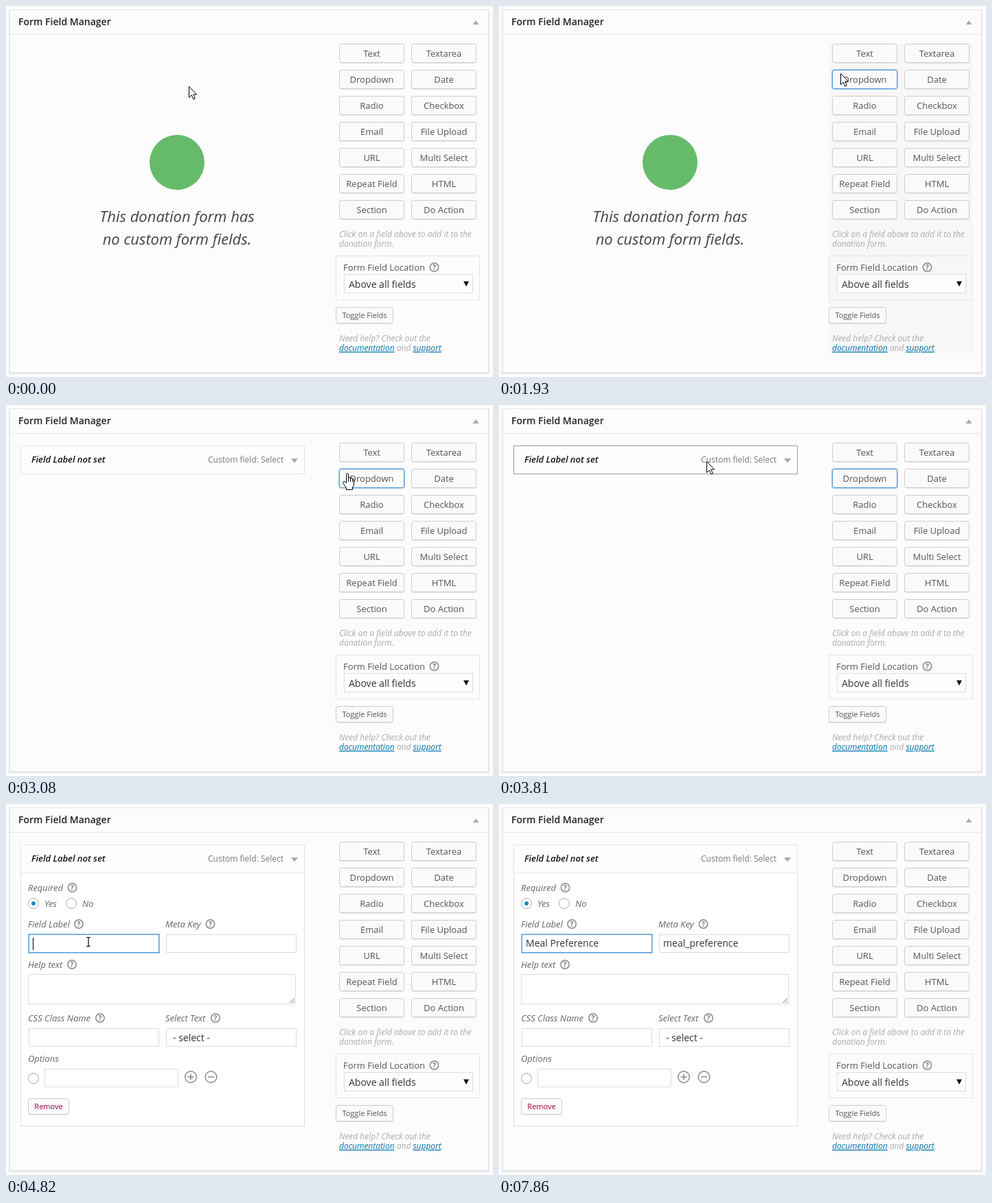
Recreate the animation shown at these times as an HTML page. Size 709x541 px, loop 8 s.

```html
<!DOCTYPE html>
<html lang="en">
<head>
<meta charset="utf-8">
<title>Form Field Manager</title>
<style>
html, body { margin: 0; width: 100%; height: 100%; overflow: hidden; background: #fcfcfc; }
svg { display: block; width: 100vw; height: 100vh; font-family: "Open Sans", sans-serif; }
text { white-space: pre; }
</style>
</head>
<body>
<svg id="stage" viewBox="0 0 709 541"></svg>
<script>
const LOOP = 8000;
const stage = document.getElementById('stage');

// Markup helpers
const text = (x, y, str, size, fill, extra = '') =>
  `<text x="${x}" y="${y}" font-size="${size}" fill="${fill}" ${extra}>${str}</text>`;
const box = (x, y, w, h, stroke, fill = '#fff', extra = '') =>
  `<rect x="${x + .5}" y="${y + .5}" width="${w - 1}" height="${h - 1}" stroke="${stroke}" fill="${fill}" ${extra}/>`;
const ring = (x, y, r, color = '#aaa', width = 1, fill = 'none') =>
  `<circle cx="${x}" cy="${y}" r="${r}" fill="${fill}" stroke="${color}" stroke-width="${width}"/>`;
const shape = (d, attrs) => `<path d="${d}" ${attrs}/>`;
const group = (id, inner, attrs = '') => `<g id="${id}" ${attrs}>${inner}</g>`;

const ITALIC = 'font-style="italic"';
const MIDDLE = 'text-anchor="middle"';

const button = (x, y, w, h, label, size, color = '#555') =>
  box(x, y + 1, w, h, '#e6e6e6', '#e6e6e6', 'rx="3"') +
  box(x, y, w, h, '#ccc', '#fafafa', 'rx="3"') +
  text(x + w / 2, y + h / 2 + size * .38, label, size, color, MIDDLE);

const help = (x, y) => ring(x, y, 6.2, '#888', 1.5) +
  text(x, y + 3.6, '?', 10, '#777', MIDDLE + ' font-weight="700"');

const label = (x, y, str, iconX) =>
  text(x, y + 5, str, 13, '#666', ITALIC) + (iconX ? help(iconX, y) : '');

const input = (x, y, w, h) => box(x, y, w, h, '#ddd');

const focus = (id, x, y, w, h, r) => group(id,
  box(x - 1, y - 1, w + 2, h + 2, '#9cc8e4', 'none', `rx="${r}"`) +
  box(x, y, w, h, '#5b9dd9', 'none', `rx="${r}"`));

const signs = (x, plus) => ring(x, 398, 8.3, '#888', 1.4) +
  shape(`M${x - 4.5} 398h9` + (plus ? `M${x} 393.5v9` : ''), 'stroke="#888" stroke-width="1.5"');

// Window frame
const frame =
  `<rect x="4" y="6" width="700" height="531" fill="#e8e8e8"/>` +
  box(5, 5, 698, 530, '#e5e5e5', '#fcfcfc') +
  shape('M5 41.5H703', 'stroke="#e5e5e5"') +
  text(18, 28, 'Form Field Manager', 14, '#222', 'font-weight="600"') +
  shape('M679.5 27L684 21L688.5 27Z', 'fill="#aaa"');

const empty = group('empty',
  '<circle cx="249" cy="228" r="40" fill="#66bb6a"/>' +
  text(249, 315, 'This donation form has', 22, '#444', ITALIC + MIDDLE) +
  text(249, 348, 'no custom form fields.', 22, '#444', ITALIC + MIDDLE));

// Sidebar
const types = ['Text', 'Textarea', 'Dropdown', 'Date', 'Radio', 'Checkbox', 'Email',
  'File Upload', 'URL', 'Multi Select', 'Repeat Field', 'HTML', 'Section', 'Do Action'];
const link = s => `<tspan fill="#0073aa" text-decoration="underline">${s}</tspan>`;

const sidebar =
  '<rect id="tint" x="480" y="55" width="210" height="451" fill="#f7f7f7"/>' +
  group('tools',
    types.map((s, i) => button(485 + i % 2 * 105, 55 + (i >> 1) * 38, 95, 28, s, 13)).join('') +
    focus('pick', 485, 93, 95, 28, 3) +
    text(485, 337, 'Click on a field above to add it to the', 12, '#aaa', ITALIC) +
    text(485, 351, 'donation form.', 12, '#aaa', ITALIC) +
    button(480, 439, 84, 24, 'Toggle Fields', 11) +
    text(485, 489, 'Need help? Check out the', 12, '#aaa', ITALIC) +
    text(485, 503, `${link('documentation')} and ${link('support')}.`, 12, '#aaa', ITALIC)) +
  group('place',
    box(480, 364, 210, 65, '#e5e5e5', 'none') +
    text(491, 386, 'Form Field Location', 13, '#555') + help(623.5, 381) +
    box(492, 391, 188, 28, '#ddd', '#fdfdfd') +
    text(499, 411, 'Above all fields', 14, '#333') +
    shape('M666 401.5H674L670 409Z', 'fill="#111"'));

// Spinner: arc segments that thicken and darken toward the head
const SEGS = 24;
const spinPoint = i => {
  const a = i / SEGS * Math.PI * 2;
  return `${(12.8 * Math.cos(a)).toFixed(2)} ${(12.8 * Math.sin(a)).toFixed(2)}`;
};
const spinner = group('spin', Array.from({ length: SEGS }, (_, i) => shape(
  `M${spinPoint(i)}A12.8 12.8 0 0 1 ${spinPoint(i + 1.1)}`,
  `fill="none" stroke="#333" stroke-opacity="${.12 + .88 * i / SEGS}" stroke-width="${1.4 + 2.2 * i / SEGS}"`)).join(''));

// Field editor
const editor = group('field',
  group('body',
    input(21, 100, 414, 370).replace('<rect', '<rect id="edge"') +
    group('form',
      label(32, 122, 'Required', 96.5) +
      ring(40, 145, 7.5, '#aaa', 1, '#fff') + '<circle cx="40" cy="145" r="3" fill="#1e8cbe"/>' +
      label(56, 145, 'Yes') + ring(95, 145, 7.5, '#aaa', 1, '#fff') + label(111, 145, 'No') +
      label(32, 175, 'Field Label', 106) + input(33, 190, 190, 27) +
      label(232, 175, 'Meta Key', 297.5) + input(233, 190, 190, 27) +
      label(32, 234, 'Help text', 96) + input(32, 248, 390, 44) +
      shape('M413 290L420 283M417 290L420 287', 'stroke="#888"') +
      label(32, 312, 'CSS Class Name', 137) + input(33, 327, 190, 27) +
      label(232, 312, 'Select Text', 305) + input(233, 327, 190, 27) +
      text(243, 346, '- select -', 14, '#333') +
      label(32, 371, 'Options') + ring(40, 400, 7.5, '#aaa', 1, '#fff') +
      input(56, 386, 195, 27) + signs(269, true) + signs(298.5, false) +
      button(32, 429, 60, 24, 'Remove', 11, '#a00040') +
      focus('active', 33, 190, 190, 27, 0) +
      text(39, 208, '', 14, '#333', 'id="name"') +
      text(239, 208, '', 14, '#333', 'id="key"') +
      '<rect id="caret" y="195" width="1" height="18" fill="#000"/>',
      'clip-path="url(#slide)"')) +
  box(21, 59, 414, 42, '#e5e5e5', '#fefefe', 'id="head"') +
  text(37, 84, 'Field Label not set', 13, '#111', ITALIC + ' font-weight="600"') +
  text(294, 84, 'Custom field: Select', 12, '#777') +
  shape('M415 78H425L420 84.5Z', 'fill="#aaa"'));

// Pointers, drawn around their hot spot
const INK = 'fill="#fff" stroke="#000" stroke-linejoin="round"';
const pointers =
  group('arrow', shape('M.5 .5V16.5L4.2 13L6.9 19L9.3 18L6.7 12H11.6Z', INK)) +
  group('hand',
    shape('M-1.5 14V3.5Q-1.5 2 0 2T1.5 3.5V9Q1.5 7.5 3 7.5T4.5 9V10Q4.5 8.5 6 8.5T7.5 10V11' +
      'Q7.5 9.5 8.5 9.5T9.5 11V17Q9.5 20 7.5 22V25.5H-1.5V23L-6 16.5Q-7 14.5-5.5 13.7T-3 14.5L-1.5 16Z', INK) +
    shape('M1.5 9V14M4.5 10V14M7.5 11V14', 'stroke="#000"')) +
  group('beam', shape('M-3 -6.5H-1Q0 -6.5 0 -5.5Q0 -6.5 1 -6.5H3M0 -5.5V5.5' +
    'M-3 6.5H-1Q0 6.5 0 5.5Q0 6.5 1 6.5H3', 'fill="none" stroke="#000" stroke-width="1.2"'));

stage.innerHTML =
  '<defs><clipPath id="slide"><rect id="mask" x="20" y="101" width="416" height="0"/></clipPath></defs>' +
  frame + empty + sidebar + spinner + editor + pointers;

const el = {};
stage.querySelectorAll('[id]').forEach(n => el[n.id] = n);
const show = (node, on) => { node.style.display = on ? '' : 'none'; };
const set = (node, name, value) => node.setAttribute(name, value);

// Screen refreshes come in bursts: [first, last, count]
const bursts = [[280, 670, 4], [950, 1930, 8], [2080, 2770, 6], [2930, 3080, 2], [3360, 4250, 7],
  [4390, 4390, 1], [4510, 4820, 3], [5250, 5250, 1], [5530, 5920, 4], [6200, 7160, 8],
  [7290, 7410, 2], [7710, 7860, 2]];
const ticks = [0];
for (const [a, b, n] of bursts)
  for (let i = 0; i < n; i++) ticks.push(n > 1 ? Math.round(a + (b - a) * i / (n - 1)) : a);
const hold = t => ticks.reduce((last, k) => k <= t ? k : last, 0);

const clamp = v => Math.max(0, Math.min(1, v));
const swing = p => .5 - Math.cos(Math.PI * clamp(p)) / 2;

// Pointer route: [time, x, y]
const route = [[0, 266, 117], [280, 265, 117], [670, 261, 114], [810, 261, 114], [1650, 497, 98],
  [3220, 497, 98], [3880, 296, 81], [4000, 294, 82], [4250, 294, 105], [4390, 264, 124],
  [4665, 120, 201], [LOOP, 120, 201]];
function pointerAt(t) {
  const i = Math.max(1, route.findIndex(p => p[0] >= t));
  const [ta, xa, ya] = route[i - 1], [tb, xb, yb] = route[i];
  const p = swing((t - ta) / (tb - ta));
  return [Math.round(xa + (xb - xa) * p), Math.round(ya + (yb - ya) * p)];
}

const phrase = 'Meal Preference';
const strokes = [5530, 5660, 5790, 5790, 5920, 6200, 6337, 6474, 6611, 6749, 6886, 7023, 7023, 7160, 7290];
const pen = document.createElement('canvas').getContext('2d');
pen.font = '14px "Open Sans", sans-serif';

function draw(time) {
  const t = hold(time);

  // Loading state
  const busy = t < 2930 ? clamp((t - 1930) / 420) : t < 3080 ? .4 : 0;
  set(el.tools, 'opacity', 1 - .6 * busy);
  set(el.place, 'opacity', 1 - .4 * busy);
  show(el.tint, t >= 1930 && t < 2080);
  show(el.spin, t >= 2080 && t < 2930);
  set(el.spin, 'transform', `translate(586 288.5) rotate(${90 + (t - 2770) * .36})`);
  show(el.pick, t >= 1790 && t < 4820);

  // Field and its sliding body
  const added = t >= 2930;
  show(el.empty, !added);
  show(el.field, added);
  const height = Math.round(369 * swing((t - 3940) / 400));
  show(el.body, height > 0);
  set(el.edge, 'height', height);
  set(el.mask, 'height', height);
  set(el.head, 'stroke', t >= 3640 && t < 4390 ? '#999' : '#e5e5e5');

  // Typing
  const typed = phrase.slice(0, strokes.filter(k => k <= t).length);
  el.name.textContent = typed;
  el.key.textContent = typed.trim().toLowerCase().replace(' ', '_');
  show(el.active, t >= 4820);
  show(el.caret, t >= 4820 && t !== 5250 && t < 7860);
  set(el.caret, 'x', Math.floor(39 + pen.measureText(typed).width));

  // Pointer
  const [x, y] = pointerAt(t);
  const kind = t >= 4665 ? 'beam' : (t >= 1600 && t < 1930) || (t >= 3080 && t < 3400) ? 'hand' : 'arrow';
  for (const k of ['arrow', 'hand', 'beam']) {
    show(el[k], k === kind && t < 7710);
    set(el[k], 'transform', `translate(${x} ${y})`);
  }
}

function tick() {
  draw(performance.now() % LOOP);
  requestAnimationFrame(tick);
}
tick();
</script>
</body>
</html>
```
